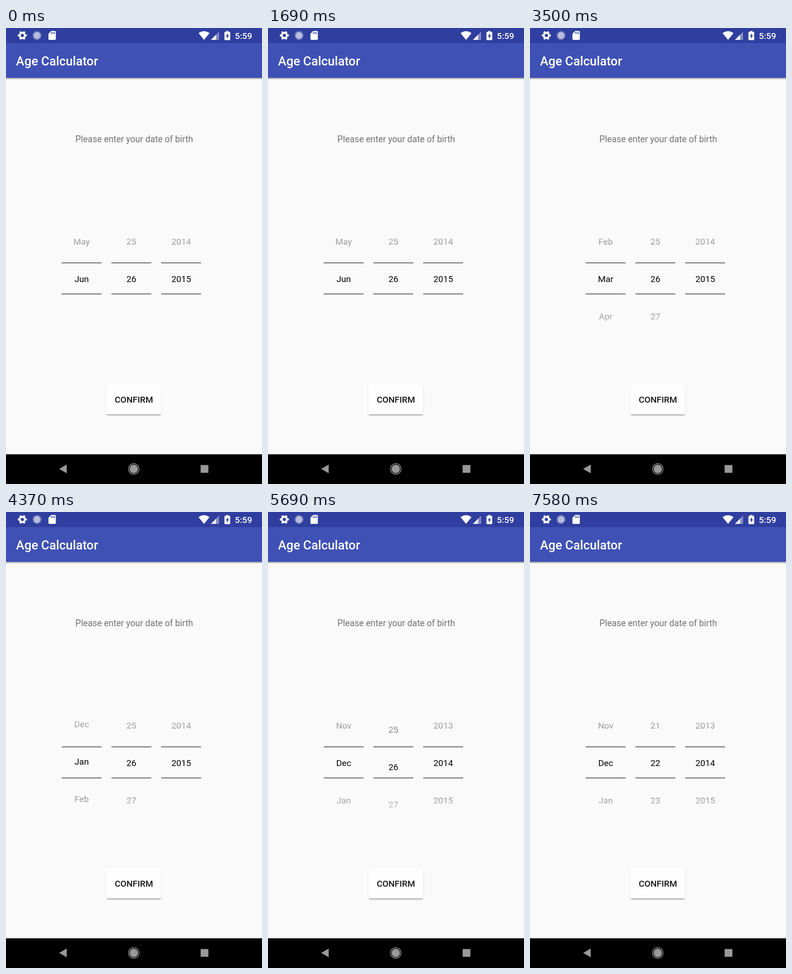
These frames come from a looping animation (561 px wide and 998 px high, 8 s). An HTML page:

```html
<!DOCTYPE html>
<html lang="en">
<head>
<meta charset="utf-8">
<title>Age Calculator</title>
<style>
  html, body { margin: 0; width: 100%; height: 100%; overflow: hidden; background: #fafafa; }
  svg { display: block; width: 100%; height: 100%; font-family: Roboto, sans-serif; font-size: 19.2px; }
  .bold { font-weight: 500; }
  .mid { text-anchor: middle; }
</style>
</head>
<body>
<svg viewBox="0 0 561 998">
  <defs>
    <linearGradient id="edge" x1="0" y1="0" x2="0" y2="1">
      <stop offset="0" stop-color="#fff" stop-opacity="0"/>
      <stop offset=".46" stop-color="#fff"/>
      <stop offset=".54" stop-color="#fff"/>
      <stop offset="1" stop-color="#fff" stop-opacity="0"/>
    </linearGradient>
    <mask id="fade" maskUnits="userSpaceOnUse" x="100" y="426" width="350" height="246">
      <rect x="100" y="426" width="350" height="246" fill="url(#edge)"/>
    </mask>
    <filter id="blur" x="-20%" y="-20%" width="140%" height="140%">
      <feGaussianBlur stdDeviation="1.8"/>
    </filter>
  </defs>

  <rect width="561" height="998" fill="#fafafa"/>

  <!-- app bar -->
  <rect x="-10" y="60" width="581" height="51" fill="#000" opacity=".4" filter="url(#blur)"/>
  <rect width="561" height="109" fill="#3f51b5"/>
  <rect width="561" height="33" fill="#303f9f"/>
  <text class="bold" x="22" y="81.5" font-size="27.3" fill="#fff">Age Calculator</text>

  <!-- status bar -->
  <g fill="#fff">
    <g fill="none" stroke="#fff">
      <circle cx="35.8" cy="16.3" r="5.6" stroke-width="4.2"/>
      <circle cx="35.8" cy="16.3" r="8.3" stroke-width="3.2" pathLength="12" stroke-dasharray="1 1" stroke-dashoffset=".5"/>
    </g>
    <circle cx="68" cy="16.3" r="7.6" opacity=".66"/>
    <circle cx="68" cy="16.3" r="8.8" fill="none" stroke="#fff" stroke-width="1.5" stroke-dasharray="1.4 1.2" opacity=".7"/>
    <path d="M99 6.5h8.400q1.800 0 1.800 1.800v16q0 1.800-1.800 1.800h-12.600q-1.800 0-1.800-1.800v-11.800z"/>
    <path d="M99.400 9v4m3.400-4v4m3.400-4v4" stroke="#303f9f" stroke-width="1.700"/>
    <path d="M434 26L422 11.300Q434 2.700 446 11.300Z"/>
    <path d="M467 8v18h-18z" opacity=".4"/>
    <path d="M460.500 14.500v11.500h-11.500z" opacity=".9"/>
    <path d="M482.500 6.500h5v2h2.500q1.300 0 1.300 1.300v15.400q0 1.300-1.300 1.300h-10q-1.300 0-1.300-1.300v-15.400q0-1.300 1.300-1.300h2.500z"/>
    <path d="M486.200 11l-4.400 7.500h2.600v5l4.200-7.500h-2.400z" fill="#303f9f"/>
    <text class="bold" x="501.500" y="23.800">5:59</text>
  </g>

  <text class="mid" x="281" y="250" font-size="19.3" fill="#737373">Please enter your date of birth</text>

  <g id="wheels" class="mid" mask="url(#fade)" fill="#040404"></g>
  <path d="M122 514h87.500M231 514h87.500M340 514h87.500M122 582h87.500M231 582h87.500M340 582h87.500" stroke="#808080" stroke-width="2.600"/>

  <!-- button -->
  <rect x="221" y="783" width="118.500" height="64.500" rx="2" fill="#000" opacity=".38" filter="url(#blur)"/>
  <rect x="220" y="780" width="120.500" height="65.500" rx="2" fill="#fefefe"/>
  <text class="mid bold" x="280.300" y="819.800" fill="#171717">CONFIRM</text>

  <!-- navigation bar -->
  <rect y="933" width="561" height="65" fill="#000"/>
  <g fill="#999">
    <path d="M133 955.500v19l-16.500-9.500z"/>
    <circle cx="280" cy="965" r="9.200"/>
    <circle cx="280" cy="965" r="11.500" fill="none" stroke="#999" stroke-width="1.500"/>
    <rect x="426.500" y="956.500" width="17" height="17" rx="1"/>
  </g>
</svg>
<script>
const LOOP = 8000, STEP = 41.5, ROW = 82, GAP = 63, SNAP = 300;
const MONTHS = 'Jan Feb Mar Apr May Jun Jul Aug Sep Oct Nov Dec'.split(' ');

// Each tap: [time of first visible step, ms already elapsed at that step]
const monthTaps = [[2470, 20], [2890, 21], [3250, 42], [3880, 36], [4246, 20.5], [4578, 17]];
const dayTaps = [[5690, 19], [6050, 40], [6380, 32], [7290, 37]];

const wheels = document.getElementById('wheels');

function makeWheel(x) {
  return [-1, 0, 1].map(() => {
    const el = document.createElementNS('http://www.w3.org/2000/svg', 'text');
    el.setAttribute('x', x);
    return wheels.appendChild(el);
  });
}
const month = makeWheel(165.8), day = makeWheel(274.8), year = makeWheel(384);

// Viscous-fluid easing: short exponential start, long soft stop
function viscous(x) {
  const curve = v => v < 1 ? v - 1 + Math.exp(-v) : 1 - (1 - 1 / Math.E) * Math.exp(1 - v);
  return curve(8 * x) / curve(8);
}

// Rows passed and pixel offset of a wheel; a new row enters past the gap
function scroll(taps, t) {
  let rows = 0, shift = 0;
  for (const [first, lead] of taps) {
    if (t < first) break;
    const ms = lead + STEP * Math.floor((t - first + 0.5) / STEP);
    shift = ROW * viscous(Math.min(1, ms / SNAP));
    if (shift > GAP) {
      rows++;
      shift -= ROW;
    }
  }
  return { rows, shift };
}

function show(wheel, shift, label) {
  wheel.forEach((el, i) => {
    el.setAttribute('y', (555.8 + ROW * (i - 1) + shift).toFixed(2));
    const text = label(i - 1);
    if (el.textContent !== text) el.textContent = text;
  });
}

function draw(t) {
  const m = scroll(monthTaps, t), d = scroll(dayTaps, t);
  const atLimit = m.rows === 0;
  const thisYear = m.rows < 6 ? 2015 : 2014;
  show(month, m.shift, i => atLimit && i > 0 ? '' : MONTHS[(17 - m.rows + i) % 12]);
  show(day, d.shift, i => atLimit && i > 0 ? '' : String(26 - d.rows + i));
  show(year, 0, i => thisYear + i > 2015 ? '' : String(thisYear + i));
}

const start = performance.now();
function tick(now) {
  draw(Math.max(0, now - start) % LOOP);
  requestAnimationFrame(tick);
}
draw(0);
requestAnimationFrame(tick);
</script>
</body>
</html>
```
